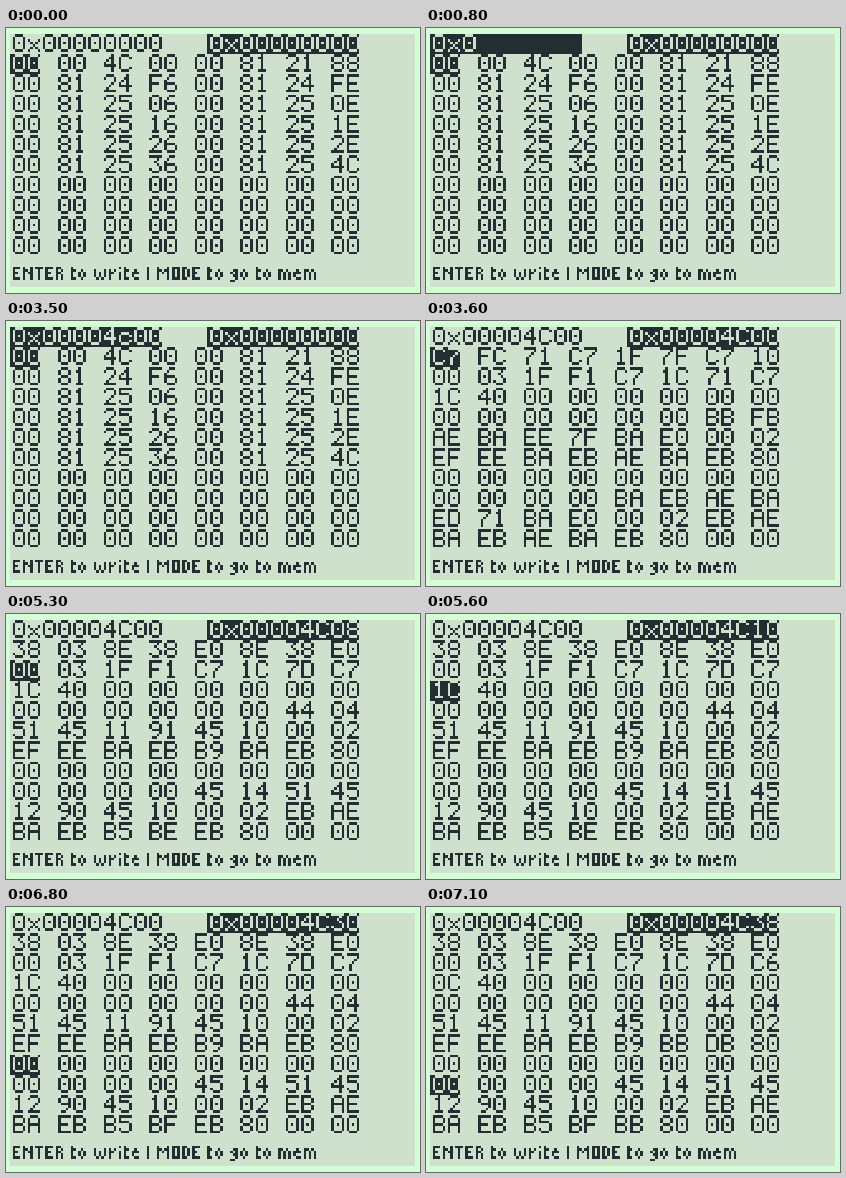
Write an HTML page that moves like this. It is 414x265 px and loops after 8900 ms.

```html
<!DOCTYPE html>
<html lang="en">
<head>
<meta charset="utf-8">
<title>Memory editor</title>
<style>
  html, body { margin: 0; width: 100%; height: 100%; overflow: hidden; background: #d3ffd4; }
  svg { display: block; width: 414px; height: 265px; }
  path { fill: none; stroke-width: 1; stroke-linecap: square; }
</style>
</head>
<body>
<svg viewBox="0 0 414 265" shape-rendering="crispEdges">
  <g transform="translate(4.02 6) scale(2.531)">
    <rect width="160" height="100" fill="#cfe0cc"/>
    <g id="lcd"></g>
  </g>
</svg>
<script>
const INK = '#222e31', PAPER = '#cfe0cc', LOOP = 8900;

// Pen strokes on a 5 by 7 grid, one unit per LCD dot.
const LARGE = {
  0: 'M1 0h2M0 1v4M4 1v4M1 6h2M2 3h0',
  1: 'M2 0v6M1 1h0M1 6h2',
  2: 'M0 1h0M1 0h2M4 1v1M3 3h0M2 4h0M1 5h0M0 6h4',
  3: 'M0 0h4M3 1h0M2 2h0M3 3h0M4 4v1M1 6h2M0 5h0',
  4: 'M3 0v6M2 1h0M1 2h0M0 3v1h4',
  5: 'M4 0h-4v2h3M4 3v2M1 6h2M0 5h0',
  6: 'M2 0h1M1 1h0M0 2v3M1 3h2M4 4v1M1 6h2',
  7: 'M0 0h4v1M3 2h0M2 3h0M1 4v2',
  8: 'M1 0h2M0 1v1M4 1v1M1 3h2M0 4v1M4 4v1M1 6h2',
  9: 'M1 0h2M0 1v1M4 1v3M1 3h3M3 5h0M1 6h1',
  A: 'M1 0h2M0 1v5M4 1v5M0 3h4',
  B: 'M0 0v6M0 0h3M4 1v1M0 3h3M4 4v1M0 6h3',
  C: 'M1 0h2M4 1h0M0 1v4M4 5h0M1 6h2',
  D: 'M0 0v6M0 0h3M4 1v4M0 6h3',
  E: 'M4 0h-4v6h4M0 3h3',
  F: 'M4 0h-4v6M0 3h3',
  c: 'M1 2h2M4 3h0M0 3v2M4 5h0M1 6h2',
  x: 'M0 2h0M4 2h0M1 3h0M3 3h0M2 4h0M1 5h0M3 5h0M0 6h0M4 6h0'
};

// Proportional small letters: advance, strokes.
const SMALL = {
  E: [4, 'M2 0h-2v4h2M0 2h1'],
  N: [5, 'M0 0v4M3 0v4M1 1h0M2 2h0'],
  T: [4, 'M0 0h2M1 0v4'],
  R: [4, 'M0 0v4M0 0h1M2 1h0M0 2h1M2 3v1'],
  M: [6, 'M0 0v4M4 0v4M1 1h0M3 1h0M2 2h0'],
  O: [4, 'M0 0h2v4h-2v-4'],
  D: [4, 'M0 0v4M0 0h1M2 1v2M0 4h1'],
  t: [3, 'M0 0v4h1M0 1h1'],
  o: [4, 'M1 1h0M0 2v1M2 2v1M1 4h0'],
  w: [6, 'M0 1v2M2 2v1M4 1v2M1 4h0M3 4h0'],
  r: [4, 'M0 1v3M2 1h0M1 2h0'],
  i: [2, 'M0 0h0M0 2v2'],
  e: [4, 'M1 1h0M0 2h2M0 2v1M1 4h1'],
  g: [4, 'M1 1h1v3M0 2h0M1 3h1M0 5h1'],
  m: [6, 'M0 1v3M1 1h0M2 2v2M3 1h0M4 2v2'],
  '|': [2, 'M0 0v4'],
  ' ': [2, '']
};

const bytes = s => s.trim().split(/\s+/);
const zeros = n => ' 00'.repeat(n);

const START = bytes(`00 00 4C 00 00 81 21 88
  00 81 24 F6 00 81 24 FE
  00 81 25 06 00 81 25 0E
  00 81 25 16 00 81 25 1E
  00 81 25 26 00 81 25 2E
  00 81 25 36 00 81 25 4C` + zeros(32));

const JUMPED = bytes(`C7 FC 71 C7 1F 7F C7 10
  00 03 1F F1 C7 1C 71 C7 1C 40` + zeros(12) + ` BB FB
  AE BA EE 7F BA E0 00 02
  EF EE BA EB AE BA EB 80` + zeros(12) + ` BA EB AE BA
  ED 71 BA E0 00 02 EB AE
  BA EB AE BA EB 80 00 00`);

const MOVING = bytes(`38 03 8E 38 E0 8E 38 E0
  00 03 1F F1 C7 1C 7D C7 1C 40` + zeros(12) + ` 44 04
  51 45 11 91 45 10 00 02
  EF EE BA EB B9 BA EB 80` + zeros(12) + ` 45 14 51 45
  12 90 45 10 00 02 EB AE
  BA EB B5 BE EB 80 00 00`);

// The dump covers screen memory, so the tens digit of the address shows up in it.
const TENS = ['C7 1C BA EB BE EB', 'C7 BC BB 3B BF BB',
              'C7 1C BA EB BF EB', 'C6 0C BB DB BF BB'];
const TENS_AT = [15, 16, 45, 46, 75, 76];

const KEYS = [800, 1100, 1400, 1800, 2300, 2800, 3200, 3500];
const EDIT = 500, JUMP = 3600, MOVE = 5300, MOVE_STEP = 300;

const stroke = (d, x, y, color) =>
  `<path d="${d}" stroke="${color}" transform="translate(${x + .5} ${y + .5})"/>`;

function print(text, col, row, boxed = 0) {
  const x = col * 6, y = row * 8;
  let out = `<g role="img" aria-label="${text}">`;
  if (boxed) out += `<rect x="${x}" y="${y}" width="${boxed * 6}" height="8" fill="${INK}"/>`;
  [...text].forEach((ch, i) => {
    out += stroke(LARGE[ch], x + i * 6 + 1, y, boxed ? PAPER : INK);
  });
  return out + '</g>';
}

function printSmall(text, x, y) {
  let out = `<g role="img" aria-label="${text}">`;
  for (const ch of text) {
    const [advance, d] = SMALL[ch];
    if (d) out += stroke(d, x, y, INK);
    x += advance;
  }
  return out + '</g>';
}

function dump(t, line) {
  if (t < JUMP) return START;
  if (!line) return JUMPED;
  const data = MOVING.slice();
  bytes(TENS[Math.floor((line - 1) / 2)]).forEach((b, i) => { data[TENS_AT[i]] = b; });
  return data;
}

function screen(t) {
  const line = t < MOVE ? 0 : Math.min(7, 1 + Math.floor((t - MOVE) / MOVE_STEP));
  const base = t < JUMP ? 0 : 0x4C00;
  const hex = n => '0x' + n.toString(16).toUpperCase().padStart(8, '0');
  const editing = t >= EDIT && t < JUMP;
  const typed = '0x' + '00004c00'.slice(0, KEYS.filter(k => k <= t).length);

  let out = editing ? print(typed, 0, 0, 10) : print(hex(base), 0, 0);
  out += print(hex(base + line * 8), 13, 0, 10);
  dump(t, line).forEach((b, i) => {
    out += print(b, i % 8 * 3, 1 + (i >> 3), i === line * 8 ? 2 : 0);
  });
  return out + printSmall('ENTER to write | MODE to go to mem', 1, 92);
}

const lcd = document.getElementById('lcd');
const begin = performance.now();
let shown = '';

function draw(now) {
  const next = screen(Math.max(0, now - begin) % LOOP);
  if (next !== shown) lcd.innerHTML = shown = next;
  requestAnimationFrame(draw);
}
draw(begin);
</script>
</body>
</html>
```
